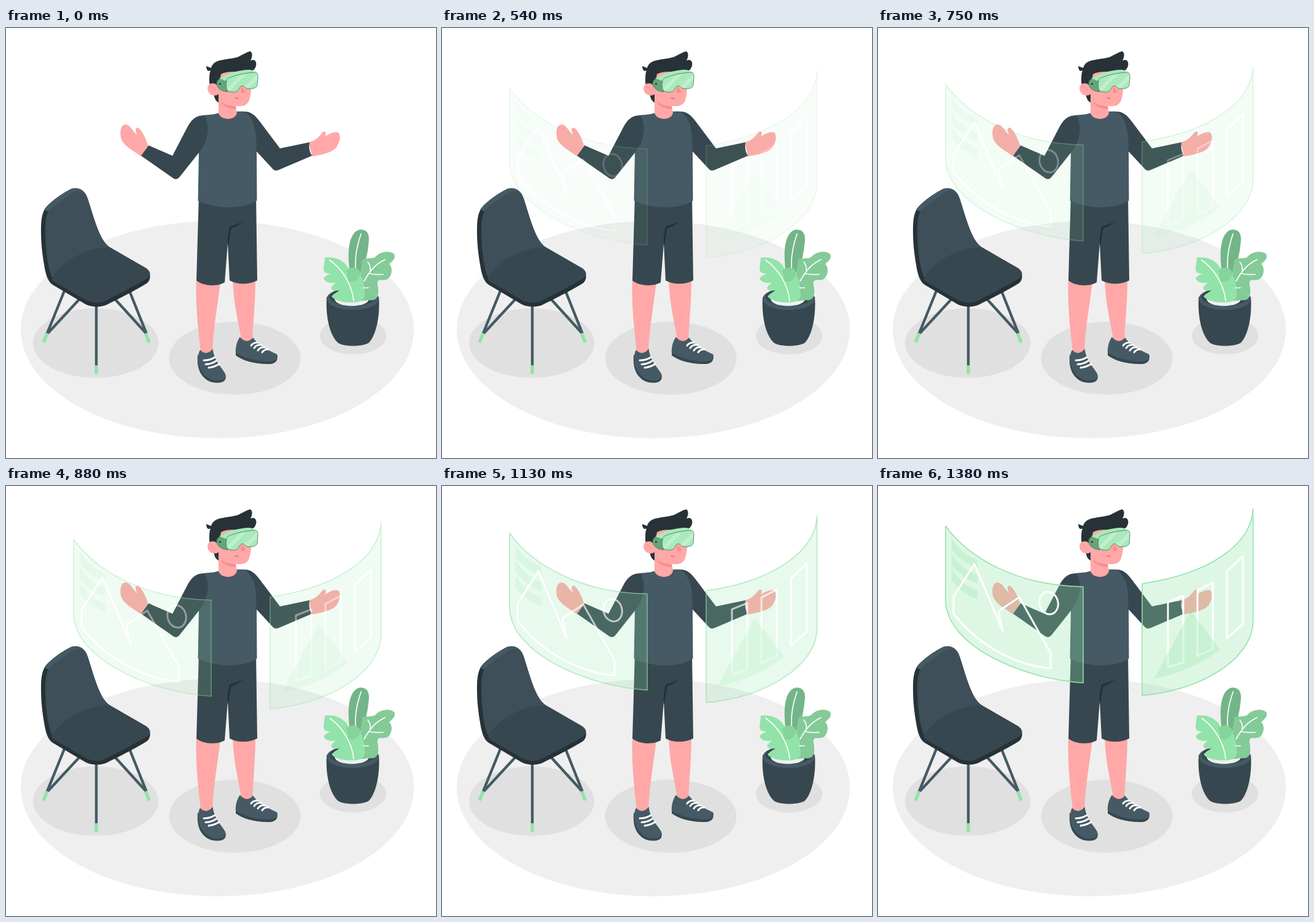
These frames come from a looping animation (700x700 px, 1430 ms). An HTML page:

```html
<!DOCTYPE html>
<html lang="en">
<head>
<meta charset="utf-8">
<title>Virtual panels</title>
<style>
html, body { margin: 0; width: 100%; height: 100%; overflow: hidden; background: #fff; }
svg { display: block; width: 100%; height: 100%; }
.skin { fill: #ffa8a7; }
.black { fill: #263238; }
.dark { fill: #37474f; }
.slate { fill: #455a64; }
.mint { fill: #92e3a9; }
.line { fill: none; stroke: #fff; stroke-linecap: round; stroke-linejoin: round; }
.glass { fill: #92e3a9; fill-opacity: .3; }
.edge { stroke: #92e3a9; stroke-width: 1.6; stroke-linejoin: round; }
</style>
</head>
<body>
<svg viewBox="0 0 700 700">
  <ellipse cx="344" cy="491" rx="320" ry="177" fill="#efefef"/>
  <g fill="#e0e0e0">
    <ellipse cx="146" cy="513" rx="102" ry="56.5"/>
    <ellipse cx="372.5" cy="537.5" rx="107" ry="59.5"/>
    <ellipse cx="565" cy="501" rx="54" ry="30.5"/>
  </g>

  <g id="chair">
    <g fill="none" stroke="#455a64" stroke-width="4.4">
      <path d="M95 428L67 497M119 442L68 497M147 450V550M201 428L228.500 497M178 442L228 497"/>
      <path stroke="#92e3a9" stroke-width="5.5" d="M67 497L61 512M147 549V563M227.500 497L233 512"/>
    </g>
    <path class="black" d="M57 330C57 310 59 297 68 289C80 277 95 268 104 263C114 258 128 261 133 278C142 305 152 347 169 357L228 391C237 397 236 410 230 415C215 425 185 440 165 450C155 455 141 455 130 450L76 418C67 412 64 398 62 385C58 362 57 345 57 330Z"/>
    <path class="slate" d="M62 296C70 284 90 270 104 263C114 258 128 261 133 278C142 305 152 347 169 357L150 365L70 299Z"/>
    <path fill="#3e4f59" d="M64 330C64 310 66 300 73 294C85 284 98 275 110 267C120 262 129 266 133 278C142 305 152 347 169 357L120 385L76 407C69 397 64 360 64 330Z"/>
    <path class="dark" d="M75 407C90 380 132 356 169 357L228 391C237 397 236 404 229 408C215 417 185 432 166 442C155 449 142 449 130 443L80 414C77 412 74 410 75 407Z"/>
  </g>

  <g id="plant">
    <path class="dark" d="M522 438C520 470 527 501 541 513C552 519 578 519 590 513C603 500 609 468 607 438Z"/>
    <ellipse class="slate" cx="564.5" cy="441" rx="42.5" ry="18"/>
    <ellipse class="dark" cx="564.5" cy="438" rx="38" ry="14.5"/>
    <ellipse cx="563" cy="441" rx="28" ry="11.5" fill="#f0f0f0"/>
    <path fill="#73b588" d="M560 398C556 375 555 334 575 328.500C589 327 593 337 590 353C588 375 582 392 574 402Z"/>
    <path fill="#84cb98" d="M580 377C592 373 598 377 603 371C611 363 626 362 632 368C635 375 629 380 624 384C630 391 629 402 621 409C612 412 607 408 605 413C604 417 606 421 606 426C607 438 602 445 592 443L563 446C574 425 577 400 580 377Z"/>
    <path class="mint" d="M519 374C533 372 550 376 557 391L577 402C583 413 584 422 583 430C586 437 582 444 573 446C557 448 537 446 530 437C534 432 539 430 543 427C536 428 531 428 529 423C531 419 535 416 537 414C530 416 519 415 517 407C522 402 526 401 529 400C522 400 517 398 517 392Z"/>
    <path fill="#84d49b" d="M554 395C564 386 578 390 576 402C573 411 564 415 558 412Z"/>
    <path class="line" stroke-width="1.7" d="M578 335C571 355 568 373 569 390M617 377C602 384 593 394 583 412M592 400Q604 402 614 401M593 395Q594 387 589 381M582 423H590M527 378C546 391 563 416 566 444"/>
  </g>

  <g id="person">
    <path class="skin" d="M310 405H350C345 450 337 490 336 528H317C313 490 308 450 310 405ZM369 405H406C406 450 402 480 401 512H384C379 480 370 450 369 405Z"/>
    <g id="shoes">
      <path class="dark" d="M312 532C311 547 313 556 318 564C325 574 334 578 345 577.500C355 577 359 573 357.500 565Z"/>
      <path class="slate" d="M316 524C311 533 312 546 317 556C322 567 333 574 345 574C354 574 359 570 357 563C352 553 339 543 336.500 522C332 529 323 532 316 524Z"/>
      <path class="dark" d="M374 525V533C386 542 408 548 430 547C440 546 443 540 441.500 532Z"/>
      <path class="slate" d="M381 503C376 509 373 521 374 529C386 536 408 543 428 543C439 543 443 538 441 531C428 525 411 517 402 504C397 511 388 512 381 503Z"/>
      <path class="line" stroke-width="3" d="M322 541Q332 541 340 536M325 547.500Q335 547 342 542M330 553Q339 552 347 547M399 517Q402 512 410 512M404 521Q408 515 416 516M410 525Q414 519 421 520M417 528Q420 523 427 523"/>
    </g>
    <path class="dark" d="M314 270H407L409 411C396 418 376 418 364 411L361 350L356 414C345 421 322 421 310 411Z"/>
    <path class="black" d="M361 352C360 340 362 331 364 323C371 321 379 318 386 315C379 321 374 324 367 326C364 336 364 350 361 356Z"/>

    <path class="skin" d="M231 191C228 180 222 168 216 163C211 160 209 167 214 174C206 169 203 157 194 157C187 158 185 168 187 179C192 193 207 199 220 209ZM493 186C503 184 509 178 515 170C519 166 523 170 519 177C526 172 535 168 541 170C546 176 543 187 538 194C531 203 515 206 498 209Z"/>
    <path class="slate" d="M322 142C335 141 342 140 347 138L376 136C388 135 396 137 401 141C407 160 408 180 408 200L408.500 281C385 296 340 295 312.500 281L314 200C314 175 315 155 322 142Z"/>
    <path class="dark" d="M323 142C308 142 301 151 296 160L271 208L232 191L220 208L270 243C275 247 279 247 283 242L314 203C328 187 334 160 323 142ZM388 136C400 136 406 143 413 152L446 196L494 186Q492 199 498 208L444 231C439 233 436 232 433 228L407 200C408 175 407 148 388 136Z"/>

    <path class="black" d="M347 122C341 119 339 114 338 106C334 101 331 95 331 85C331 79 331 74 333 69C329 72 326 68 326 62L334 65C338 49 360 53 378 47C386 43 392 39 398 38C402 41 401 48 398 53C407 49 410 59 405 66C402 72 390 70 384 70L356 85Z"/>
    <path class="skin" d="M346 108C337 113 328 107 328 98C329 89 339 87 346 95L350 75C360 69 385 70 399 78C400 92 399 108 396 117C393 127 384 128 374 127L376 138C374 151 350 151 346 139Z"/>
    <path fill="#f28f8f" d="M349 119C355 125 366 127 374 127.500L374 132C363 132 353 128 349 119ZM383 96L391 104Q385 107 382 105Z"/>
    <path fill="none" stroke="#e87b7e" stroke-width="2" stroke-linecap="round" d="M373 113.500Q376 116 378 114"/>
    <path fill="none" stroke="#f28f8f" d="M332 96Q338 95 341 103"/>

    <g id="headset" stroke="#407554" stroke-width=".8" stroke-linejoin="round">
      <path fill="#65a57b" d="M343 91C343 84 348 80 358 83L361 104C352 103 344 99 343 91Z"/>
      <path fill="#a9e9bb" stroke="none" d="M347 82L363 74C377 70 392 67 400 68.500L408 73L358 86Z"/>
      <path fill="#a9e9bb" d="M359 87C359 83 362 81 366 80C379 75 393 73 405 72C409 72 410 75 410 80L409 93C408 98 402 99 395 99C389 99 387 93 384 94C380 95 380 100 376 103C370 106 361 104 359 100C358 95 358 91 359 87Z"/>
      <path stroke="none" fill="#c0efcd" d="M360 98L381 77L391 75L364 103ZM388 95L409 75V84L395 98Z"/>
      <circle cx="348.500" cy="91" r="1.500" fill="#263238" stroke="none"/>
    </g>
  </g>

  <g id="panels">
    <path class="glass edge" d="M110 65C148 118 226 162 334 164V320.500C240 315 110 262 110 185Z"/>
    <path class="glass edge" d="M430 159C540 143 608 95 610.500 37V222C608 285 520 334 430 341Z"/>
    <path class="glass" id="stripes"/>
    <g class="line" stroke-width="3">
      <path d="M123 180L157 127L203 236L196 204L230 181L281 272V297C222 292 162 258 123 208Z"/>
      <ellipse cx="278" cy="190.500" rx="15" ry="18.500" transform="rotate(-14 278 190.500)"/>
      <path d="M472 189L497 179V287L472 295ZM520 170L545 157V265L520 277ZM568 139L594 114V225L568 248Z"/>
    </g>
    <path class="glass" d="M509 203L557 266Q512 302 449 314Z"/>
  </g>
</svg>
<script>
const LOOP = 1430, FPS = 24, LAST = 33, SPAN = 33.3, RISE = 42, SETTLE = 0.65;
const panels = document.getElementById('panels');

document.getElementById('stripes').setAttribute('d', [86, 111, 136]
  .map(y => `M120 ${y}Q138 ${y + 26} 162 ${y + 34}v14Q138 ${y + 40} 120 ${y + 18}Z`).join(''));

// cubic-bezier(.42, 0, 1, 1), solved by bisection
function easeIn(x) {
  let lo = 0, hi = 1;
  for (let i = 0; i < 24; i++) {
    const s = (lo + hi) / 2, r = 1 - s;
    if (1.26 * r * r * s + 3 * r * s * s + s ** 3 < x) lo = s; else hi = s;
  }
  return lo * lo * (3 - 2 * lo);
}

function draw(now) {
  const t = Math.floor((now % LOOP) / 10) * 10;
  const step = Math.min(LAST, Math.floor((t + 5) * FPS / 1000));
  const p = step < 2 ? 0 : easeIn(step / SPAN);
  panels.setAttribute('opacity', p.toFixed(4));
  panels.setAttribute('transform', `translate(0 ${(RISE * (1 - p) - SETTLE).toFixed(2)})`);
}

const start = performance.now();
function tick() {
  draw(performance.now() - start);
  requestAnimationFrame(tick);
}
tick();
</script>
</body>
</html>
```
